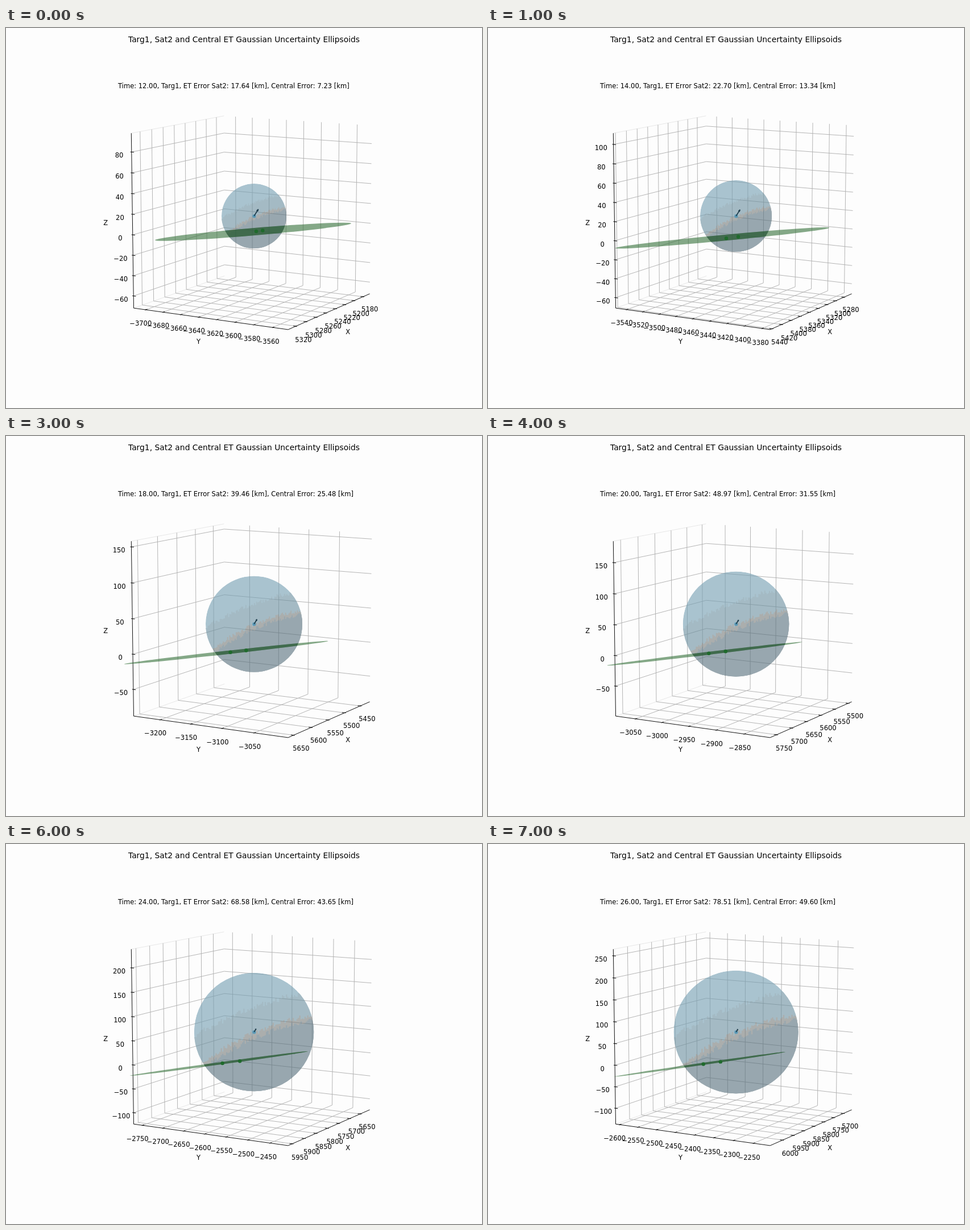
An HTML page for the animation above (8000 ms loop, 837 px wide and 669 px high).

```html
<!DOCTYPE html>
<html lang="en">
<head>
<meta charset="utf-8">
<title>Uncertainty Ellipsoids</title>
<style>
html, body { margin: 0; width: 100%; height: 100%; overflow: hidden; background: #fdfdfd; }
svg { display: block; }
text { font: 11.54px "DejaVu Sans", sans-serif; fill: #000; }
.mid { text-anchor: middle; }
.title { font-size: 13.85px; }
path { fill: none; stroke-width: .93; }
</style>
</head>
<body>
<svg width="837" height="669" viewBox="0 0 837 669">
  <defs>
    <clipPath id="ball"><ellipse id="ballClip" cx="436" cy="331"/></clipPath>
    <clipPath id="unit"><circle r="1"/></clipPath>
  </defs>
  <text class="mid title" x="418.5" y="25">Targ1, Sat2 and Central ET Gaussian Uncertainty Ellipsoids</text>
  <text id="info" x="197" y="106.4"></text>
  <path id="pane" stroke="#e6e6e6"/>
  <path id="grid" stroke="#b0b0b0"/>
  <path id="frame" stroke="#000"/>
  <path id="ticks" stroke="#000"/>
  <g id="labels" class="mid"></g>
  <text class="mid" x="601.3" y="539">X</text>
  <text class="mid" x="338.6" y="556.4">Y</text>
  <text class="mid" x="175.2" y="346.6">Z</text>
  <g id="sphere" opacity=".6"><g id="shade" clip-path="url(#unit)"></g></g>
  <circle cx="436.4" cy="331.2" r="3.1" fill="#5a9ab8"/>
  <path id="arrow" stroke="#1f3d4c" style="stroke-width:1.7"/>
  <ellipse id="disc" fill="#357039" fill-opacity=".6"/>
  <g clip-path="url(#ball)"><ellipse id="discIn" fill="#1e4b2d" fill-opacity=".45"/></g>
  <circle id="dotA" r="3.2" fill="#1f6a2c"/>
  <circle id="dotB" r="3.2" fill="#1f6a2c"/>
</svg>
<script>
const $ = id => document.getElementById(id);
const rad = Math.PI / 180;
const H = 0.5501, SCALE = 278.7, CX = 436.1, CY = 330.7;
const sa = Math.sin(30 * rad), ca = Math.cos(30 * rad);
const se = Math.sin(10 * rad), ce = Math.cos(10 * rad);

// One state per second: errors, axis centre, half range, tick step, sphere radii,
// disc tips and half thickness, the two dots
const states = [
  { err: [17.64, 7.23], mid: [5249.8, -3628.9, 13], half: 85, step: 20, r: [57, 57],
    disc: [262, 373.5, 607, 344, 6.5], dots: [440, 358, 451.3, 356.5] },
  { err: [22.70, 13.34], mid: [5352.5, -3462.4, 20.2], half: 91.3, step: 20, r: [63, 63],
    disc: [224, 387.6, 600.5, 351.6, 5.2], dots: [419, 370.2, 440, 367.5] },
  { err: [30.50, 19.43], mid: [5449.4, -3293.3, 27.8], half: 105.3, step: 25, r: [74.4, 74.2],
    disc: [211, 396, 583.5, 357, 3.8], dots: [404, 376, 430, 374.2] },
  { err: [39.46, 25.48], mid: [5542, -3121.4, 34.9], half: 123, step: 50, r: [85, 84.5],
    disc: [208, 401.5, 566.5, 361, 3], dots: [394.6, 380.8, 422.3, 377.5] },
  { err: [48.97, 31.55], mid: [5628.7, -2946.6, 42.4], half: 141.8, step: 50, r: [93.3, 92.5],
    disc: [209.5, 404, 553, 362.6, 2.6], dots: [388.3, 382.7, 417.8, 379.2] },
  { err: [58.66, 37.64], mid: [5710.5, -2770, 50], half: 161, step: 50, r: [100, 99],
    disc: [213, 406, 540.5, 364, 2.3], dots: [382.8, 384.3, 414, 380.6] },
  { err: [68.58, 43.65], mid: [5785.5, -2590.8, 57], half: 181, step: 50, r: [105.2, 104.2],
    disc: [217.5, 408, 531, 365, 2.1], dots: [380.6, 386, 411.2, 382.2] },
  { err: [78.51, 49.60], mid: [5856, -2410, 64], half: 201, step: 50, r: [109.5, 108.3],
    disc: [222, 409.6, 523, 366, 1.9], dots: [378.7, 387.5, 408.8, 383.4] }
];

// Box coordinates run from -1 to 1 on each axis
function project(x, y, z) {
  x *= H; y *= H; z *= H;
  const near = x * ca + y * sa;
  const k = SCALE * 10 / (10 - near * ce - z * se);
  return [CX + (y * ca - x * sa) * k, CY - (z * ce - near * se) * k];
}

const line = (...pts) =>
  "M" + pts.map(p => project(...p).map(v => v.toFixed(2)).join(" ")).join("L");

const set = (id, attrs) => {
  for (const k in attrs) $(id).setAttribute(k, attrs[k]);
};

const noise = n => {
  const v = Math.sin(n * 127.1) * 43758.5453;
  return v - Math.floor(v);
};

// Ragged region of the unit sphere below a curve
function region(curve, jitter, color, seed) {
  const n = 90;
  let pts = "-1.1,1.1";
  for (let i = 0; i < n; i++) {
    const x = -1 + 2 * i / n;
    const y = curve(x) + (noise(i + seed) - .5) * jitter;
    pts += ` ${x.toFixed(3)},${y.toFixed(3)} ${(x + 2 / n).toFixed(3)},${y.toFixed(3)}`;
  }
  return `<polygon points="${pts} 1.1,1.1" fill="${color}"/>`;
}

const upper = x => -.42 - .38 * x + .1 * x * x;
const lower = x => .06 - .45 * x + .16 * x * x;
$("shade").innerHTML =
  '<circle r="1" fill="#739eb2"/>' +
  region(upper, .1, "#6a8f9f", 3) +
  region(x => lower(x) - .05, .09, "#757a79", 200) +
  region(x => lower(x) + .04, .09, "#566f7c", 400);

set("pane", { d: line([1, -1, 1], [-1, -1, 1]) + line([1, -1, -1], [-1, -1, -1]) });
set("frame", { d: line([1, -1, 1], [1, -1, -1], [1, 1, -1], [-1, 1, -1]) });

const IN = 1 - .033, OUT = 1 + .016;
const axes = [
  {
    grid: t => line([t, -1, 1], [t, -1, -1], [t, 1, -1]),
    tick: t => line([t, IN, -1], [t, OUT, -1]),
    at: t => project(t, 1, -1),
    shift: t => [12.6 + .8 * t, 22.8 + .8 * t]
  },
  {
    grid: t => line([-1, t, 1], [-1, t, -1], [1, t, -1]),
    tick: t => line([IN, t, -1], [OUT, t, -1]),
    at: t => project(1, t, -1),
    shift: t => [-8.3 + .6 * t, 24 + .8 * t]
  },
  {
    grid: t => line([1, -1, t], [-1, -1, t], [-1, 1, t]),
    tick: t => line([1, -IN, t], [1, -OUT, t]),
    at: t => project(1, -1, t),
    shift: () => [-21.8, 5.8]
  }
];

function drawAxes(s) {
  let grid = "", ticks = "", labels = "";
  axes.forEach((axis, i) => {
    const mid = s.mid[i], reach = s.half * .965;
    for (let n = Math.ceil((mid - reach) / s.step); n * s.step <= mid + reach; n++) {
      const value = n * s.step, t = (value - mid) / s.half;
      const [x, y] = axis.at(t), [dx, dy] = axis.shift(t);
      grid += axis.grid(t);
      ticks += axis.tick(t);
      labels += `<text x="${(x + dx).toFixed(2)}" y="${(y + dy + 4.2).toFixed(2)}">` +
        `${value < 0 ? "\u2212" : ""}${Math.abs(value)}</text>`;
    }
  });
  set("grid", { d: grid });
  set("ticks", { d: ticks });
  $("labels").innerHTML = labels;
}

function drawArrow(half) {
  const dx = 637 / half, dy = -1020 / half;
  const x = 436.2 + dx, y = 331 + dy;
  const barb = a => {
    const c = Math.cos(a) * .3, s = Math.sin(a) * .3;
    return `M${x} ${y}l${-dx * c + dy * s} ${-dx * s - dy * c}`;
  };
  set("arrow", { d: `M436.2 331L${x} ${y}` + barb(.26) + barb(-.26) });
}

function draw(i) {
  const s = states[i];
  $("info").textContent = `Time: ${(12 + 2 * i).toFixed(2)}, Targ1, ET Error Sat2: ` +
    `${s.err[0].toFixed(2)} [km], Central Error: ${s.err[1].toFixed(2)} [km]`;
  drawAxes(s);
  drawArrow(s.half);
  set("shade", { transform: `translate(436 331) scale(${s.r})` });
  set("ballClip", { rx: s.r[0], ry: s.r[1] });

  const [x1, y1, x2, y2, thick] = s.disc;
  const turn = Math.atan2(y2 - y1, x2 - x1) / rad;
  const disc = {
    rx: Math.hypot(x2 - x1, y2 - y1) / 2, ry: thick,
    transform: `translate(${(x1 + x2) / 2} ${(y1 + y2) / 2}) rotate(${turn})`
  };
  set("disc", disc);
  set("discIn", disc);
  const [ax, ay, bx, by] = s.dots;
  set("dotA", { cx: ax, cy: ay });
  set("dotB", { cx: bx, cy: by });
}

let start = null, shown = -1;
function tick(now) {
  if (start === null) start = now;
  const i = Math.floor((now - start) / 1000) % states.length;
  if (i !== shown) draw(shown = i);
  requestAnimationFrame(tick);
}
draw(shown = 0);
requestAnimationFrame(tick);
</script>
</body>
</html>
```
